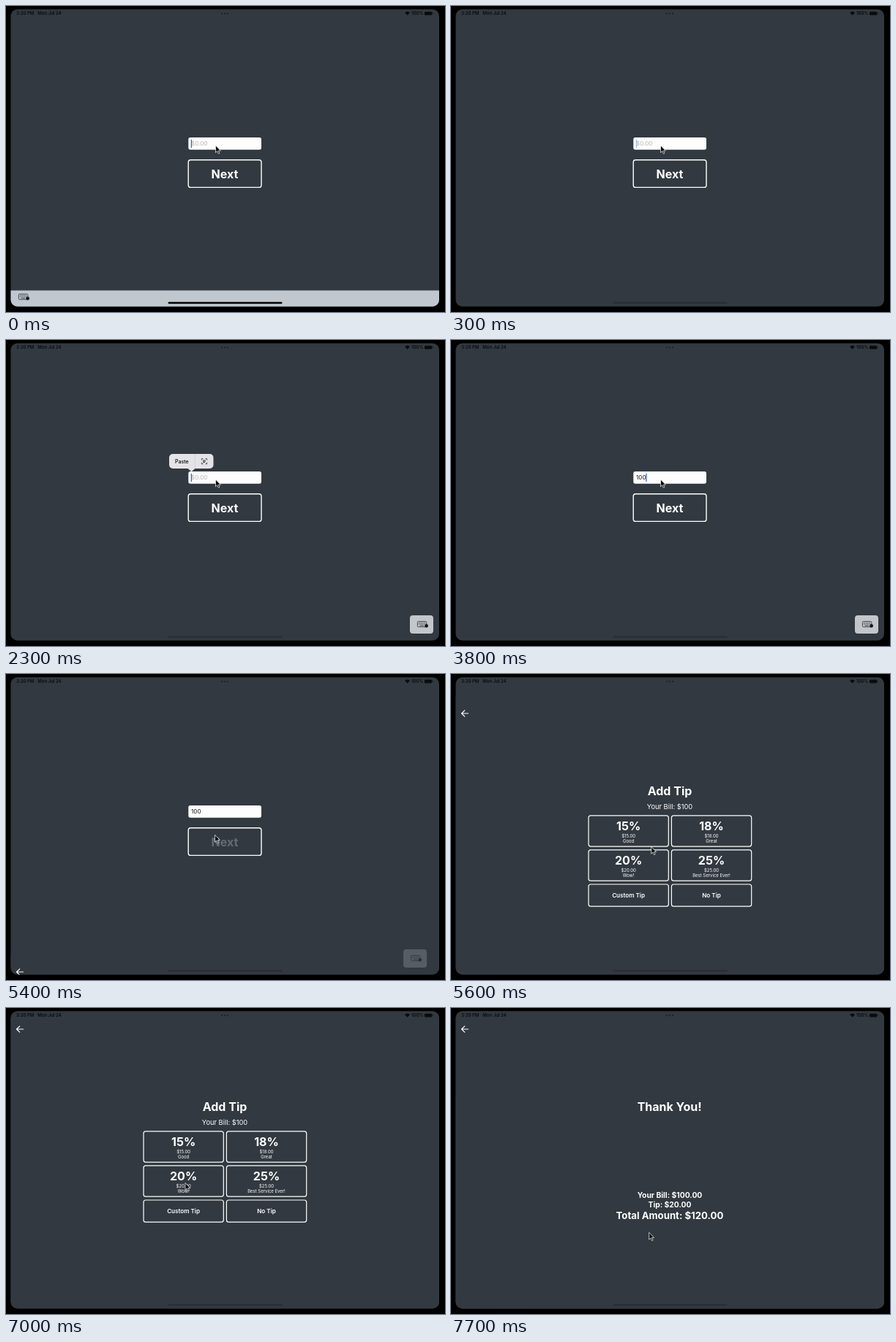
Recreate the animation shown at these times as an HTML page. Size 600 by 419 pixels, loop 8.4 s.

```html
<!DOCTYPE html>
<html lang="en">
<head>
<meta charset="utf-8">
<title>Tip calculator</title>
<style>
html, body { margin: 0; width: 100%; height: 100%; overflow: hidden; background: #000 }
svg { display: block; width: 600px; height: 419px; font-family: Inter, Roboto, sans-serif }
.bg { fill: #323940 }
.box { fill: none; stroke: #fff; stroke-width: 1.4 }
#tips .box { stroke-width: 1.2 }
.mid { fill: #fff; text-anchor: middle }
.bold { font-weight: 700 }
.title { font-size: 16px; font-weight: 700 }
.small { font-size: 6px }
.choice { font-size: 8.1px; font-weight: 600 }
.status { fill: #090c0f; font-size: 6px; font-weight: 600 }
.line { fill: none; stroke: #22262a; stroke-width: .8 }
.arrow { fill: none; stroke: #fff; stroke-width: 1.2; stroke-linecap: round; stroke-linejoin: round }
</style>
</head>
<body>
<svg viewBox="0 0 600 419">
  <defs>
    <clipPath id="device"><rect x="6.5" y="4.5" width="585.5" height="407" rx="9"/></clipPath>
    <clipPath id="below"><rect y="122" width="600" height="297"/></clipPath>
    <path id="back" class="arrow" d="M23.5 29H14.5M18.7 24.8L14.5 29L18.7 33.2"/>
    <g id="keys">
      <rect class="line" x=".4" y=".4" width="12.4" height="7.4" rx="1.2"/>
      <path class="line" d="M2 2.4H11.2M2 4.1H11.2" stroke-dasharray="1 .6"/>
      <path class="line" d="M3.6 6H9"/>
      <circle cx="12.6" cy="6.4" r="2.4" fill="#15181b"/>
    </g>
  </defs>

  <g clip-path="url(#device)">
    <rect class="bg" width="600" height="419"/>

    <rect x="249.3" y="180" width="99.7" height="16.7" rx="2.6" fill="#fdfdfd"/>
    <text id="entry" x="253" y="191.4" font-size="8.1"></text>
    <rect id="caret" y="183" width="1.2" height="11" fill="#2f62c4"/>
    <rect class="box" x="249.2" y="210.7" width="99.8" height="37.7" rx="3.2"/>
    <text id="next" class="mid title" x="299" y="235.8">Next</text>

    <g id="menu">
      <path d="M248 175.5L253.5 180.2L259 175.5Z" fill="#e4e4e8"/>
      <rect x="223" y="156" width="60.5" height="20" rx="5" fill="#e4e4e8"/>
      <path d="M258.5 156V176" stroke="#c9cace" stroke-width=".7"/>
      <text x="231" y="168.6" font-size="7" font-weight="500">Paste</text>
      <rect class="line" x="267.4" y="162.5" width="7.2" height="7.2" stroke-dasharray="2 3.2 2 0"/>
      <path class="line" d="M269 164.8H273M269 166.2H273M269 167.6H272"/>
    </g>

    <g id="tips">
      <rect class="bg" y="4" width="600" height="419"/>
      <use href="#back"/>
      <text class="mid title" x="299" y="141">Add Tip</text>
      <text class="mid" x="299" y="159.8" font-size="9.3">Your Bill: $100</text>
    </g>

    <g clip-path="url(#below)">
      <g id="thanks">
        <rect class="bg" y="4" width="600" height="419"/>
        <use href="#back"/>
        <text class="mid title" x="298.7" y="141">Thank You!</text>
        <g class="mid bold" font-size="10.3">
          <text x="299" y="260.2">Your Bill: $100.00</text>
          <text x="299" y="273.3">Tip: $20.00</text>
          <text x="299" y="289.3" font-size="13.2">Total Amount: $120.00</text>
        </g>
      </g>
    </g>

    <g id="bar">
      <rect x="6" y="389.5" width="587" height="24" fill="#c1c7cf"/>
      <use href="#keys" x="17" y="394"/>
    </g>
    <g id="dock">
      <rect x="552" y="377" width="32" height="25" rx="4" fill="#c3c6cb"/>
      <use href="#keys" x="562" y="385"/>
    </g>
    <rect id="home" x="221.5" y="405.2" width="156" height="2.6" rx="1.3"/>

    <g class="status">
      <text x="14" y="12.3">3:20 PM</text>
      <text x="43.3" y="12.3">Mon Jul 24</text>
      <text x="554" y="12.3">100%</text>
      <path d="M545 9.1Q548.6 5.8 552.2 9.1L548.6 12.8Z"/>
      <rect x="572" y="7.8" width="10.3" height="4.8" rx="1.4"/>
      <rect x="582.8" y="9.3" width=".8" height="1.8" rx=".4"/>
    </g>
    <path d="M295 10.3H304" stroke="#181c20" stroke-width="2" stroke-linecap="round" stroke-dasharray="0 4"/>
  </g>
  <g id="cursor">
    <path transform="scale(.9)" d="M0 0V10.8L2.5 8.5L4.2 12.5L6 11.7L4.3 7.9H7.6Z" fill="#060708" stroke="#fff" stroke-width=".8" stroke-linejoin="round"/>
  </g>
</svg>
<script>
const LOOP = 8400, STEP = 100, BLINK = 1250;
const typing = [2700, 3500, 3800];
const offers = { 15: 'Good', 18: 'Great', 20: 'Wow!', 25: 'Best Service Ever!' };
const home = { x: 286.5, y: 191 };
const glides = [
  { from: 4300, to: 5200, x: 285.5, y: 220.3 },
  { from: 5400, to: 5900, x: 252, y: 266 },
  { from: 6000, to: 6300, x: 250, y: 320.5 },
  { from: 6500, to: 7000, x: 245, y: 239.5 },
  { from: 7200, to: 7600, x: 270.7, y: 307.3 }
];

const $ = id => document.getElementById(id);
const move = (id, x, y) => $(id).setAttribute('transform', `translate(${x} ${y})`);
const fade = (id, v) => $(id).setAttribute('opacity', v);
const clamp = v => Math.min(1, Math.max(0, v));

// Smooth 0 to 1 between two times
function ease(t, from, to) {
  const u = clamp((t - from) / (to - from));
  return u * u * (3 - 2 * u);
}

// Critically damped rise from below the stage
function rise(t, start) {
  const s = Math.max(0, t - start) * .02;
  return Math.round(425 * (1 + s) * Math.exp(-s));
}

function cell(i, height, lines, id = '') {
  const x = 188 + i % 2 * 113.4, y = 168.8 + (i >> 1) * 47.1;
  return `<rect class="box" x="${x}" y="${y}" width="109.3" height="${height}" rx="3"/>
    <g id="${id}">${lines.map(([text, dy, style]) =>
      `<text class="mid ${style}" x="${x + 54.6}" y="${y + dy}">${text}</text>`).join('')}</g>`;
}

const cells = Object.entries(offers).map(([n, note], i) => cell(i, 42.3,
  [[n + '%', 20, 'title'], [`$${n}.00`, 30, 'small'], [note, 37.2, 'small']], 'offer' + n));
const choices = ['Custom Tip', 'No Tip'].map((name, i) => cell(4 + i, 30.2, [[name, 18, 'choice']]));
$('tips').insertAdjacentHTML('beforeend', [...cells, ...choices].join(''));

function drawField(t) {
  const typed = typing.filter(at => t >= at).length;
  $('entry').textContent = typed ? '100'.slice(0, typed) : '$0.00';
  $('entry').setAttribute('fill', typed ? '#111' : '#b4b6b9');
  // Each key press restarts the blink
  const lastKey = typed ? typing[typed - 1] : -280;
  const phase = (t - lastKey - 250) / BLINK * 2 * Math.PI;
  $('caret').setAttribute('x', 252.8 + (typed && $('entry').getComputedTextLength()));
  fade('caret', t < 5300 ? clamp(.6 + 1.6 * Math.cos(phase)) : 0);
}

function drawCursor(t) {
  let { x, y } = home;
  for (const g of glides) {
    const u = ease(t, g.from, g.to);
    x += (g.x - x) * u;
    y += (g.y - y) * u;
  }
  move('cursor', x, y);
}

function draw(t) {
  drawField(t);
  drawCursor(t);
  fade('menu', ease(t, 1400, 1900) - ease(t, 2600, 2800));
  fade('next', 1 - .75 * ease(t, 5200, 5400));
  fade('offer20', 1 - .75 * ease(t, 7100, 7300));

  const hidden = ease(t, 0, 300);
  move('bar', 0, 26 * hidden);
  fade('home', 1 - .8 * hidden);
  const docked = ease(t, 300, 800) - ease(t, 5200, 5500);
  fade('dock', docked);
  move('dock', 12 * (docked - 1), 0);

  move('tips', 0, rise(t, 5372));
  move('thanks', 0, rise(t, 7230));
}

const start = performance.now();
function tick() {
  const t = (performance.now() - start) % LOOP;
  draw(Math.floor(t / STEP) * STEP);
  requestAnimationFrame(tick);
}
tick();
</script>
</body>
</html>
```
